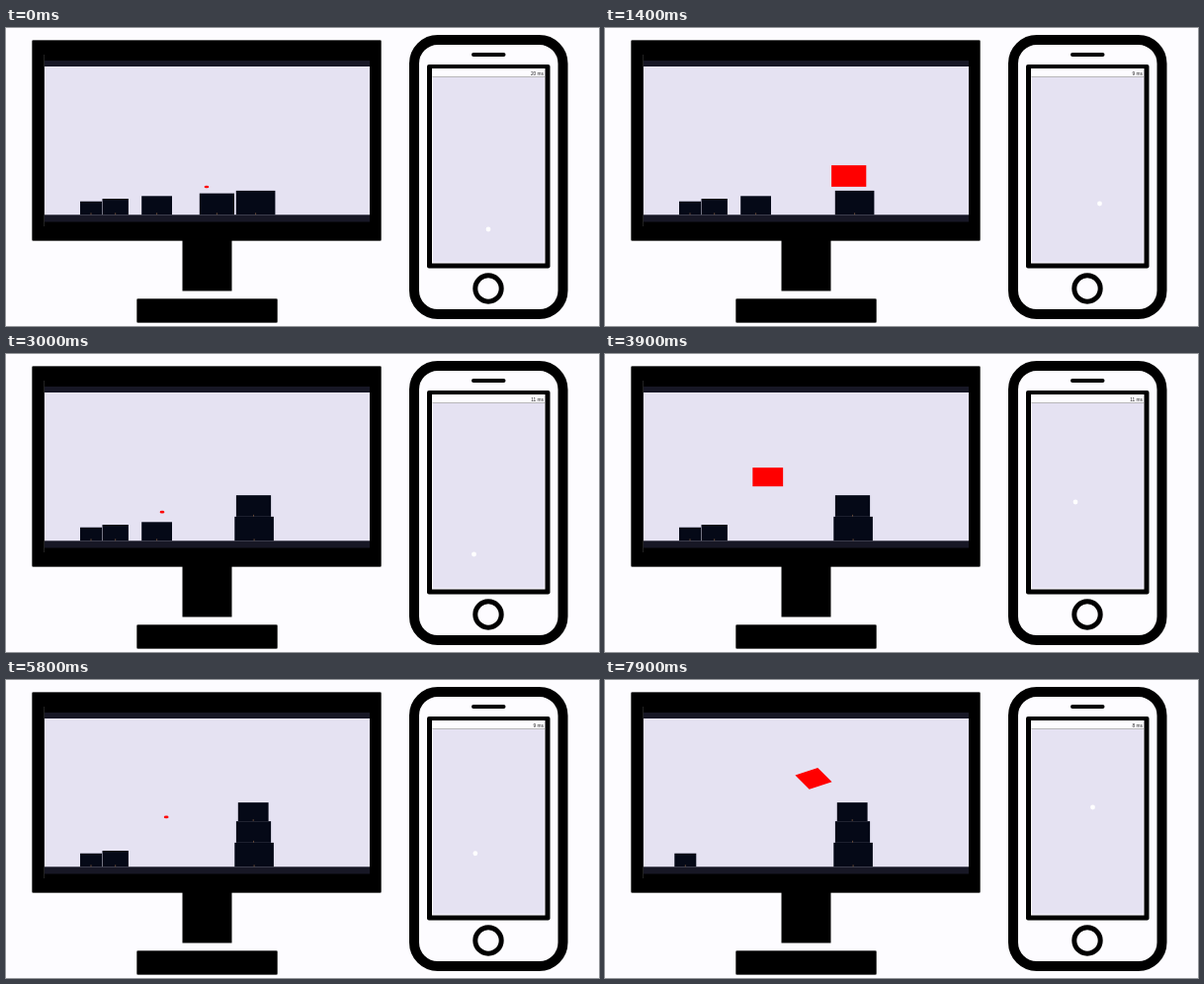
Animation, 600 px wide and 302 px high, one loop 8000 ms. Source, as an HTML page:

```html
<!DOCTYPE html>
<html lang="en">
<head>
<meta charset="utf-8">
<title>Phone as a pointer</title>
<style>
  html, body { margin: 0; width: 100%; height: 100%; overflow: hidden; background: #fdfcff; }
  svg { display: block; width: 100vw; height: 100vh; }
  text { font: 4.8px "Liberation Sans", Arial, sans-serif; fill: #222; }
  .edge { stroke: #555; }
  .paper { fill: #fdfcff; }
  .sky { fill: #e5e2f2; }
</style>
</head>
<body>
<svg viewBox="0 0 600 302">
  <!-- monitor -->
  <rect class="edge" x="26.5" y="12.5" width="353" height="203" rx="1"/>
  <rect class="edge" x="132.5" y="274.5" width="142" height="24" rx="1"/>
  <rect x="178.5" y="214" width="50" height="52.5"/>
  <path d="M38.5 27V201" stroke="#222"/>
  <rect x="39" y="33" width="329" height="163.5" fill="#171725"/>
  <rect class="sky" x="39" y="39" width="329" height="150.3"/>
  <g id="boxes"></g>
  <ellipse id="cursor" rx="2.4" ry="1.35" fill="#f00"/>

  <!-- phone -->
  <rect class="paper" x="413" y="12" width="150.5" height="278" rx="24" stroke="#000" stroke-width="10"/>
  <path d="M473 27H503.5" stroke="#000" stroke-width="4" stroke-linecap="round"/>
  <circle class="paper" cx="488" cy="264" r="13.2" stroke="#000" stroke-width="5"/>
  <rect x="426" y="37" width="124.5" height="206.5" rx="2"/>
  <rect class="paper" x="431" y="41" width="114.5" height="197.5"/>
  <rect class="sky" x="432" y="49.5" width="112.7" height="188"/>
  <path d="M431.5 49.5H545" stroke="#aaa" stroke-width=".8"/>
  <text id="ping" x="544" y="48.4" text-anchor="end"></text>
  <circle id="touch" r="2.4" fill="#fff"/>
</svg>
<script>
const LOOP = 8000, STEP = 100, FLOOR = 189.3;
const ASPECT = 1.756; // boxes turn in a space that is stretched sideways
const $ = id => document.getElementById(id);

const ease = u => (u = Math.min(1, Math.max(0, u)), u * u * (3 - 2 * u));
const mix = (a, b, u) => a + (b - a) * u;

// turning points of the finger: time, x, y
const path = [
  [0, 488, 204], [400, 490, 215], [1400, 500.5, 178], [3000, 473.5, 203], [3300, 472, 220],
  [3900, 476, 150], [4700, 505.5, 143], [6300, 463, 198], [6900, 460, 227], [7900, 493.5, 129]
];

// small to large; a box follows the finger from grab to drop, hanging at its grip
const boxes = [
  { x: 86, goal: 81.3, drop: 6700 },
  { x: 110.7, grab: 6700, drop: LOOP, grip: [-9, -2.6], turn: -30 },
  { x: 152.6, goal: 250.2, grab: 3300, drop: 4900, grip: [-1, 5.8], level: 2 },
  { x: 213.4, goal: 250.5, grab: 400, drop: 1500, grip: [5, 9.3], level: 1 },
  { x: 252.6, goal: 251.1, drop: 1600 }
];

boxes.forEach((box, i) => {
  box.w = 22 + 4.4 * i;
  box.h = box.w * 0.617;
  $("boxes").insertAdjacentHTML("beforeend", `<g>
    <rect x="${-box.w / 2}" y="${-box.h / 2}" width="${box.w}" height="${box.h}"/>
    <path d="M0 ${box.h / 2 - 2}v2" stroke="#8a6445" stroke-width=".7"/></g>`);
  box.el = $("boxes").lastElementChild;
  [box.face, box.tick] = box.el.children;
});

// the tower is built from the largest box upwards
for (const box of boxes) {
  const below = box.level ? boxes.slice(-box.level) : [];
  box.restY = FLOOR - box.h / 2;
  box.goalY = box.restY - below.reduce((sum, b) => sum + b.h, 0);
}

// slope at key i, flat at turning points so that nothing overshoots
function slope(i, c) {
  const a = path[i - 1], b = path[i], d = path[i + 1];
  if (!a || !d) return 0;
  const before = (b[c] - a[c]) / (b[0] - a[0]), after = (d[c] - b[c]) / (d[0] - b[0]);
  return before * after > 0 ? 2 * before * after / (before + after) : 0;
}

function finger(t, c) {
  const i = path.findIndex(k => k[0] > t) - 1;
  if (i < 0) return path.at(-1)[c];
  const a = path[i], b = path[i + 1], span = b[0] - a[0], u = (t - a[0]) / span, v = 1 - u;
  return mix(a[c], b[c], ease(u)) + span * u * v * (v * slope(i, c) - u * slope(i + 1, c));
}

function place(el, x, y, more = "") {
  el.setAttribute("transform", `translate(${x} ${y}) ${more}`);
}

function show(el, visible) {
  el.setAttribute("visibility", visible ? "visible" : "hidden");
}

function draw(now) {
  const t = Math.floor(now % LOOP / STEP) * STEP;
  const touch = [finger(t, 1), finger(t, 2)];
  const cursor = [158 + (touch[0] - 473.5) * 3.1, 160.2 + (touch[1] - 203) * 0.78];
  let holding = false;

  for (const box of boxes) {
    const { grab, drop, grip, turn = 0 } = box;
    const red = t >= grab && t < drop;
    holding ||= red;
    let x = box.x, y = box.restY, angle = 0;
    if (t >= grab) {
      const lift = ease((t - grab) / 300);
      x = mix(x, cursor[0] + grip[0], lift);
      y = mix(y, cursor[1] + grip[1], lift);
      angle = turn * ease((t - grab - 300) / 800);
    }
    if (t >= drop) {
      const fall = ease((t - drop) / 400);
      x = mix(x, box.goal, fall);
      y = mix(y, box.goalY, fall);
    }
    box.face.setAttribute("fill", red ? "#f00" : "#050917");
    show(box.tick, !red);
    place(box.el, x, y, `scale(${ASPECT} 1) rotate(${angle}) scale(${1 / ASPECT} 1)`);
  }

  place($("touch"), ...touch);
  place($("cursor"), ...cursor);
  show($("cursor"), !holding);
  $("ping").textContent = [20, 9, 10, 11, 11, 11, 9, 8, 8][Math.floor(t / 900)] + " ms";
}

const start = performance.now();
function frame() {
  draw(performance.now() - start);
  requestAnimationFrame(frame);
}
frame();
</script>
</body>
</html>
```
